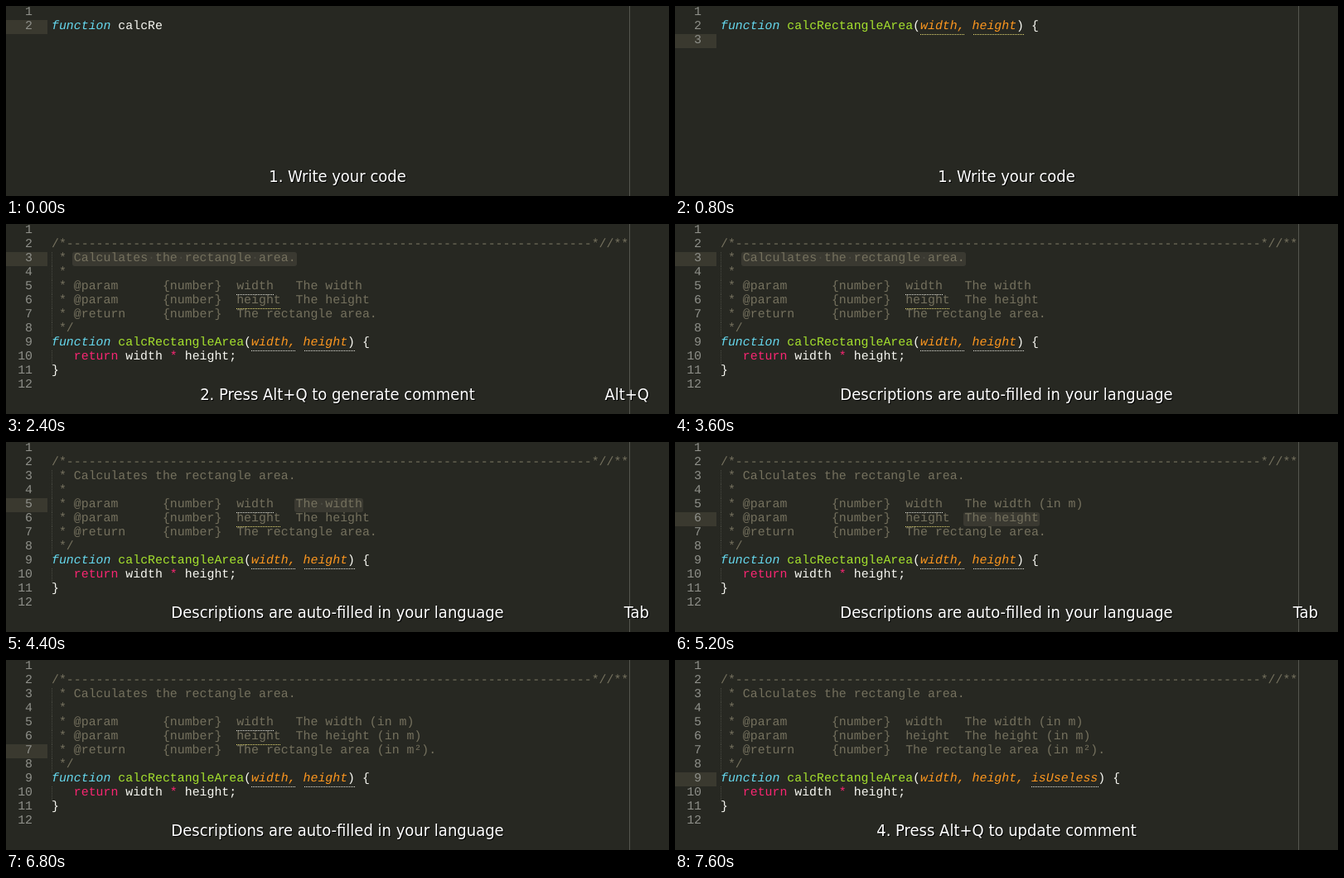
These frames come from a looping animation (800 px wide and 230 px high, 8000 ms). An HTML page:

```html
<!DOCTYPE html>
<html lang="en">
<head>
<meta charset="utf-8">
<title>Comment generator</title>
<style>
  html, body { margin: 0; width: 100%; height: 100%; overflow: hidden; background: #272822; }
  #stage { position: relative; width: 800px; height: 230px; overflow: hidden; color: #f8f8f2; }
  #stage div { position: absolute; }
  #ruler { left: 752px; top: 0; width: 1px; height: 230px; background: #55564f; }
  #code {
    left: 0; top: 0; white-space: pre; text-rendering: geometricPrecision;
    font: 14.88px/16px "Liberation Mono", monospace;
  }
  .row { left: 0; width: 800px; height: 17px; }
  .num { left: 0; width: 32px; height: 17px; padding-right: 18px; text-align: right; color: #8f908a; }
  .active .num { background: #3a392f; }
  .text { left: 55px; top: 0; }
  .guide::before {
    content: ""; position: absolute; left: 55px; top: 0; width: 1px; height: 17px;
    background: repeating-linear-gradient(#484942 0 1px, transparent 1px 2px);
  }
  .wave { height: 1px; background: repeating-linear-gradient(90deg, currentColor 0 1px, transparent 1px 2px); }
  .key { color: #66d9ef; font-style: italic; }
  .name { color: #a6e22e; }
  .arg { color: #fd971f; font-style: italic; }
  .op { color: #f92672; }
  .rem { color: #75715e; }
  .sel { background: #3a3931; border-radius: 3px; padding: 0 1.5px 1px; margin: 0 -1.5px; }
  .dot { color: #4c4b42; }
  .caption {
    left: 0; top: 194px; width: 800px; text-align: center; line-height: 24px; white-space: pre;
    color: #fff; text-shadow: 1px 1px 0 #000;
  }
  #hint { width: 776px; text-align: right; }
</style>
</head>
<body>
<div id="stage">
  <div id="ruler"></div>
  <div id="code"></div>
  <div id="note" class="caption"></div>
  <div id="hint" class="caption"></div>
</div>
<script>
const LOOP = 8000, ROW = 17;
const YELLOW = '#e6db74', PALE = '#e4e4dc';
const $ = id => document.getElementById(id);
const span = (cls, text) => `<span class="${cls}">${text}</span>`;

// Caption face: the condensed cut if present, otherwise a face of similar width
const pen = document.createElement('canvas').getContext('2d');
const widthIn = font => { pen.font = font; return pen.measureText('Write your code').width; };
const condensed = widthIn('20px "DejaVu Sans Condensed", monospace') !== widthIn('20px monospace');
for (const el of document.querySelectorAll('.caption')) {
  el.style.fontFamily = condensed ? '"DejaVu Sans Condensed", sans-serif' : '"Noto Sans", sans-serif';
  el.style.fontSize = condensed ? '20px' : '19.2px';
}

const fn = span('key', 'function') + ' ';
const head = fn + span('name', 'calcRectangleArea') + '(';
const signature = args => head + span('arg', args) + ') {';
const ret = '   ' + span('op', 'return') + ' width';
const body = [ret + ' ' + span('op', '*') + ' height;', '}', ''];
const opening = signature('width, height');

function comment(width, height, area, selected) {
  const mark = (row, text) => row === selected ? span('sel', text.replace(/ /g, span('dot', '·'))) : text;
  return [
    '',
    '/*' + '-'.repeat(71) + '*//**',
    ' * ' + mark(3, 'Calculates the rectangle area.'),
    ' *',
    ' * @param      {number}  width   ' + mark(5, 'The width' + width),
    ' * @param      {number}  height  ' + mark(6, 'The height' + height),
    ' * @return     {number}  ' + mark(7, 'The rectangle area' + area + '.'),
    ' */'
  ].map(line => line.replace(/^( ?)(.*)$/, (all, pad, rest) => rest ? pad + span('rem', rest) : ''));
}

// Dotted underlines: [row, left, width, colour]
const argWaves = (row, colour) => [[row, 296, 53, colour], [row, 360, 61, colour]];
const draftWaves = argWaves(2, YELLOW);
const docWaves = [[5, 278, 45, PALE], [6, 278, 53, YELLOW], ...argWaves(9, PALE)];

const draft = (at, active, lines, waves, note = '1. Write your code') =>
  ({ at, active, lines: ['', ...lines], waves, note, hint: '' });
const metres = ' (in m)', squared = ' (in m²)';
const filled = 'Descriptions are auto-filled in your language';
const generate = '2. Press Alt+Q to generate comment';
const doc = (at, active, selected, units, note, hint = '') => ({
  at, active, note, hint, waves: docWaves,
  lines: [...comment(...units, selected), opening, ...body]
});
const updated = (at, note) => ({
  at, active: 9, note, hint: '', waves: [[9, 430, 81, PALE]],
  lines: [...comment(metres, metres, squared), signature('width, height, isUseless'), ...body]
});

const steps = [
  draft(0, 2, [fn + 'calcRe'], []),
  draft(400, 2, [head + span('arg', 'widt')], []),
  draft(800, 3, [opening, ''], draftWaves),
  draft(1200, 3, [opening, ret], draftWaves),
  draft(1600, 5, [opening, ...body], draftWaves),
  draft(2000, 5, [opening, ...body], draftWaves, generate),
  doc(2400, 3, 3, ['', '', ''], generate, 'Alt+Q'),
  doc(3200, 3, 3, ['', '', ''], generate),
  doc(3600, 3, 3, ['', '', ''], filled),
  doc(4400, 5, 5, ['', '', ''], filled, 'Tab'),
  doc(4800, 5, 0, [metres, '', ''], filled, 'Tab'),
  doc(5200, 6, 6, [metres, '', ''], filled, 'Tab'),
  doc(5600, 6, 0, [metres, metres, ''], filled, 'Tab'),
  doc(6000, 7, 7, [metres, metres, ''], filled, 'Tab'),
  doc(6400, 7, 0, [metres, metres, squared], filled, 'Tab'),
  doc(6800, 7, 0, [metres, metres, squared], filled),
  updated(7200, '3. Modify your code'),
  updated(7600, '4. Press Alt+Q to update comment')
];

function render({ lines, active, waves, note, hint }) {
  const rows = lines.map((line, i) => {
    const cls = 'row' + (i + 1 === active ? ' active' : '') + (line[0] === ' ' ? ' guide' : '');
    return `<div class="${cls}" style="top:${i * ROW}px"><div class="num">${i + 1}</div><div class="text">${line}</div></div>`;
  });
  const dots = waves.map(([row, left, width, colour]) =>
    `<div class="wave" style="top:${row * ROW}px;left:${left}px;width:${width}px;color:${colour}"></div>`);
  $('code').innerHTML = rows.concat(dots).join('');
  $('note').textContent = note;
  $('hint').textContent = hint;
}

const start = performance.now();
let shown;
function tick() {
  const t = (performance.now() - start) % LOOP;
  const step = steps.filter(s => s.at <= t).pop();
  if (step !== shown) render(shown = step);
  requestAnimationFrame(tick);
}
tick();
</script>
</body>
</html>
```
